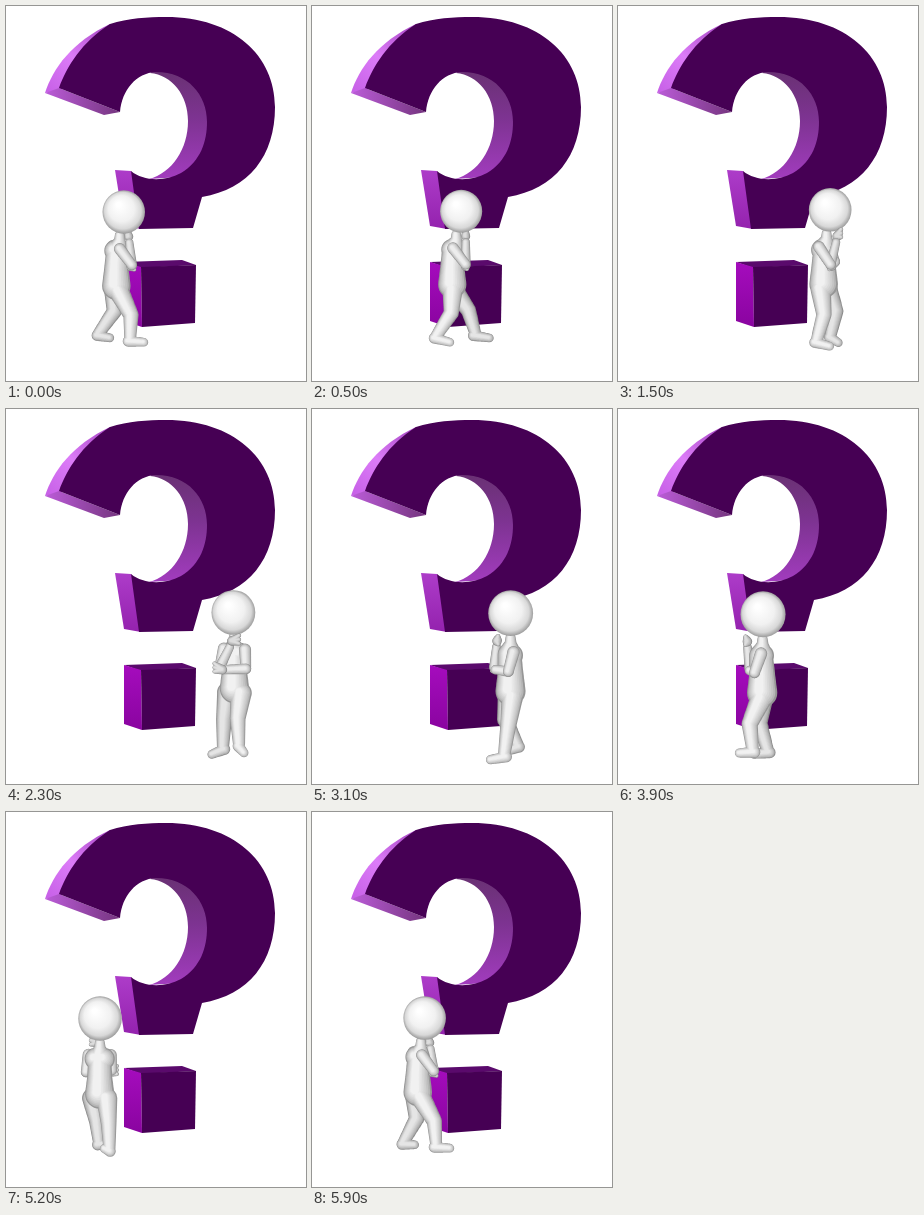
Write an HTML page with a canvas that moves like this. It is 300x375 px and loops after 6 s.

```html
<!DOCTYPE html>
<html lang="en">
<head>
<meta charset="utf-8">
<title>Pacing thinker</title>
<style>
  html, body { margin: 0; width: 100%; height: 100%; overflow: hidden; background: #fff; }
  svg, canvas { position: absolute; left: 0; top: 0; width: 300px; height: 375px; }
</style>
</head>
<body>
<svg viewBox="0 0 300 375">
  <defs>
    <linearGradient id="rim" x1="0" y1="1" x2="1" y2="0">
      <stop offset="0" stop-color="#c65fe6"/><stop offset=".45" stop-color="#dc7cf8"/><stop offset="1" stop-color="#a040bd"/>
    </linearGradient>
    <linearGradient id="end">
      <stop offset="0" stop-color="#bb5cd8"/><stop offset="1" stop-color="#75357f"/>
    </linearGradient>
    <linearGradient id="bowl" x1="0" y1="0" x2="0" y2="1">
      <stop offset="0" stop-color="#63306a"/><stop offset=".5" stop-color="#7d3391"/><stop offset="1" stop-color="#a23cbe"/>
    </linearGradient>
    <linearGradient id="stem" x1="0" y1="0" x2="0" y2="1">
      <stop offset="0" stop-color="#ad3cc9"/><stop offset="1" stop-color="#9422ae"/>
    </linearGradient>
    <linearGradient id="block" x1="0" y1="0" x2="0" y2="1">
      <stop offset="0" stop-color="#a50cbd"/><stop offset="1" stop-color="#8a04a0"/>
    </linearGradient>
  </defs>
  <path fill="url(#rim)" d="M39 87C47 62 66 36 104 18L112 18L54 84Z"/>
  <path fill="url(#end)" d="M39 87L53 82L114 106L98 109Z"/>
  <path fill="url(#bowl)" d="M144 67C166 69 182 89 182 115C182 143 166 167 143 173L190 170L215 110L170 50Z"/>
  <path fill="url(#stem)" d="M109 164L125 165L130 173L135 223L118 220Z"/>
  <path fill="#460054" d="M53 82C61 60 76 36 104 18C122 12 142 11 160 11C228 11 269 50 269 101C269 150 243 183 196 191L187 222L133 223L125 165C137 175 158 176 175 167C195 155 201 135 201 116C201 89 182 66 150 66C130 67 116 84 114 106Z"/>
  <path fill="#5a0a6c" d="M118 256L176 254L190 259L135 262Z"/>
  <path fill="url(#block)" d="M118 256L135 261L136 321L118 315Z"/>
  <path fill="#460054" d="M135 261L190 259L189 317L136 321Z"/>
</svg>
<canvas id="stage"></canvas>
<script>
const LOOP = 6000, TICK = 100;
const STRIDE = 1200, STANCE = .28;

const canvas = document.getElementById("stage");
const ctx = canvas.getContext("2d");
const dpr = window.devicePixelRatio || 1;
canvas.width = 300 * dpr;
canvas.height = 375 * dpr;
ctx.scale(dpr, dpr);

const mix = (a, b, u) => a + (b - a) * u;
const gray = v => `rgb(${v},${v},${v})`;

// Walk round a flat ellipse; cos/sin give the heading (right / to the viewer)
function bodyAt(t) {
  const phi = (t - 2170) / LOOP * 2 * Math.PI;
  const c = Math.cos(phi), near = Math.sin(phi);
  const len = Math.hypot(near, .4 * c);
  const cos = -near / len, sin = .4 * c / len;
  const hx = 161 + 67 * c, hy = 205 - 1.5 * c;
  return {
    hx, hy, cos, sin,
    tx: hx - (4 - 5 * near) * cos,
    size: 1.01 + .035 * near,
    ground: 340 + 7 * near
  };
}

// Where a foot stands while the body passes over it
function footprint(t, side) {
  const b = bodyAt(t);
  return [b.tx - 8 * side * b.sin, b.ground + 2.5 * side * b.cos, b.cos, b.sin];
}

function footAt(t, side) {
  const first = side > 0 ? 225 : 825;
  const n = Math.round((t - first) / STRIDE), mid = first + n * STRIDE;
  const u = (t - mid) / STRIDE;
  const from = u < 0 ? mid - STRIDE : mid;
  const p = ((t - from) / STRIDE - STANCE) / (1 - 2 * STANCE);
  const w = Math.min(1, Math.max(0, p)), e = w * w * (3 - 2 * w);
  const a = footprint(from, side), b = footprint(from + STRIDE, side);
  const [x, y, cos, sin] = a.map((v, i) => mix(v, b[i], e));
  return { x, y: y - 4 * Math.sin(Math.PI * w), cos, sin };
}

// Round tapered limbs, shaded by shrinking layers
function limbs(chains, tone = 0) {
  for (let k = 0; k < 8; k++) {
    const path = new Path2D();
    for (const pts of chains) {
      for (let i = 0; i + 1 < pts.length; i++) {
        const [ax, ay, ar] = pts[i], [bx, by, br] = pts[i + 1];
        const n = Math.ceil(Math.hypot(bx - ax, by - ay)) + 1;
        for (let j = 0; j <= n; j++) {
          const u = j / n, r = mix(ar, br, u);
          const x = mix(ax, bx, u) - r * .03 * k, y = mix(ay, by, u) - r * .02 * k;
          path.moveTo(x + r * (1 - k * .1), y);
          path.arc(x, y, r * (1 - k * .1), 0, 7);
        }
      }
    }
    ctx.fillStyle = gray(Math.round(150 + 80 * Math.sqrt(k / 7) + k * 1.5 - tone));
    ctx.fill(path);
  }
}

function drawHead(x, y, r) {
  const g = ctx.createRadialGradient(x - r * .25, y - r * .35, r * .1, x, y, r * 1.03);
  g.addColorStop(0, "#fff");
  g.addColorStop(.55, "#f1f1f1");
  g.addColorStop(.82, "#d8d8d8");
  g.addColorStop(1, "#969696");
  ctx.fillStyle = g;
  ctx.beginPath();
  ctx.ellipse(x, y, r, r * 1.02, 0, 0, 7);
  ctx.fill();
}

function draw(t) {
  const { hx, hy, tx, size: s, cos, sin } = bodyAt(t);
  const hipY = hy + 79 * s;

  // forward, right, up from the hips, radius -> screen
  const depth = (f, r) => f * sin + r * cos;
  const at = (f, r, up, rad) =>
    [tx + (f * cos - r * sin) * s, hipY - up * s + depth(f, r) * .15, rad * s];

  function leg(side) {
    const foot = footAt(t, side);
    const hip = at(0, side * 7, 0, 10.5);
    const heel = Math.max(0, Math.min(10, ((tx - foot.x) * cos - 10) * .5));
    const ax = foot.x, ay = foot.y - heel - 3;
    const half = Math.hypot(ax - hip[0], ay - hip[1]) / 2;
    const bend = Math.sqrt(Math.max(0, (28 * s) ** 2 - half * half)) * .6;
    const knee = [(hip[0] + ax) / 2 + bend * cos, (hip[1] + ay) / 2, 7.8 * s];
    return [
      [hip, knee, [ax, ay, 6 * s]],
      [[ax - 2 * foot.cos, ay + 2, 5.6 * s],
       [ax + 14 * foot.cos, foot.y + 1 + 5 * foot.sin, 4.4 * s]]
    ];
  }

  function hand(f, r, up, dir) {
    const palm = at(f, r, up, 4.6);
    return [[palm, at(f, r + dir * 2, up + 1, 4.2)],
      ...[6, 2, -2].map(v => [palm, at(f + 1, r + dir * 8, up + v, 2)])];
  }

  const neckX = mix(tx, hx, .45);
  const torso = [
    [neckX, hipY - 55 * s, 5 * s], [neckX, hipY - 49 * s, 6 * s],
    at(1, 0, 39, 11.5), at(0, 0, 20, 12.5), at(0, 0, 4, 14.5)
  ];
  const chest = [at(0, -4, 39, 11), at(0, 4, 39, 11)];
  const [near, far] = cos > 0 ? [1, -1] : [-1, 1];

  const elbowR = at(13, 11, 26, 5.2), elbowL = at(6, -14, 25, 5.2);
  const parts = [
    [-30, () => limbs(leg(far), 12)],
    [0, () => limbs([torso, chest, ...leg(near)])],
    [depth(8, 13), () => limbs([[at(0, 11, 43, 6), elbowR]], 4)],
    [depth(13, 5), () => limbs([[elbowR, at(14, 0, 47, 4.2)]], 10)],
    [depth(6, -13), () => limbs([[at(0, -11, 43, 6), elbowL]], 4)],
    [depth(11, -2), () => limbs([[elbowL, at(13, 8, 24, 4.4)]], 4)],
    [depth(13, 8) + 2, () => limbs(hand(13, 8, 24, 1), 16)],
    [3.5, () => drawHead(hx, hy, 21.6 * s)],
    [depth(14, -2), () => limbs(hand(14, -2, 53, -1), 20)]
  ];
  ctx.clearRect(0, 0, 300, 375);
  parts.sort((p, q) => p[0] - q[0]).forEach(p => p[1]());
}

const start = performance.now();
function loop() {
  const t = Math.max(0, performance.now() - start) % LOOP;
  draw(Math.floor(t / TICK) * TICK);
  requestAnimationFrame(loop);
}
loop();
</script>
</body>
</html>
```
